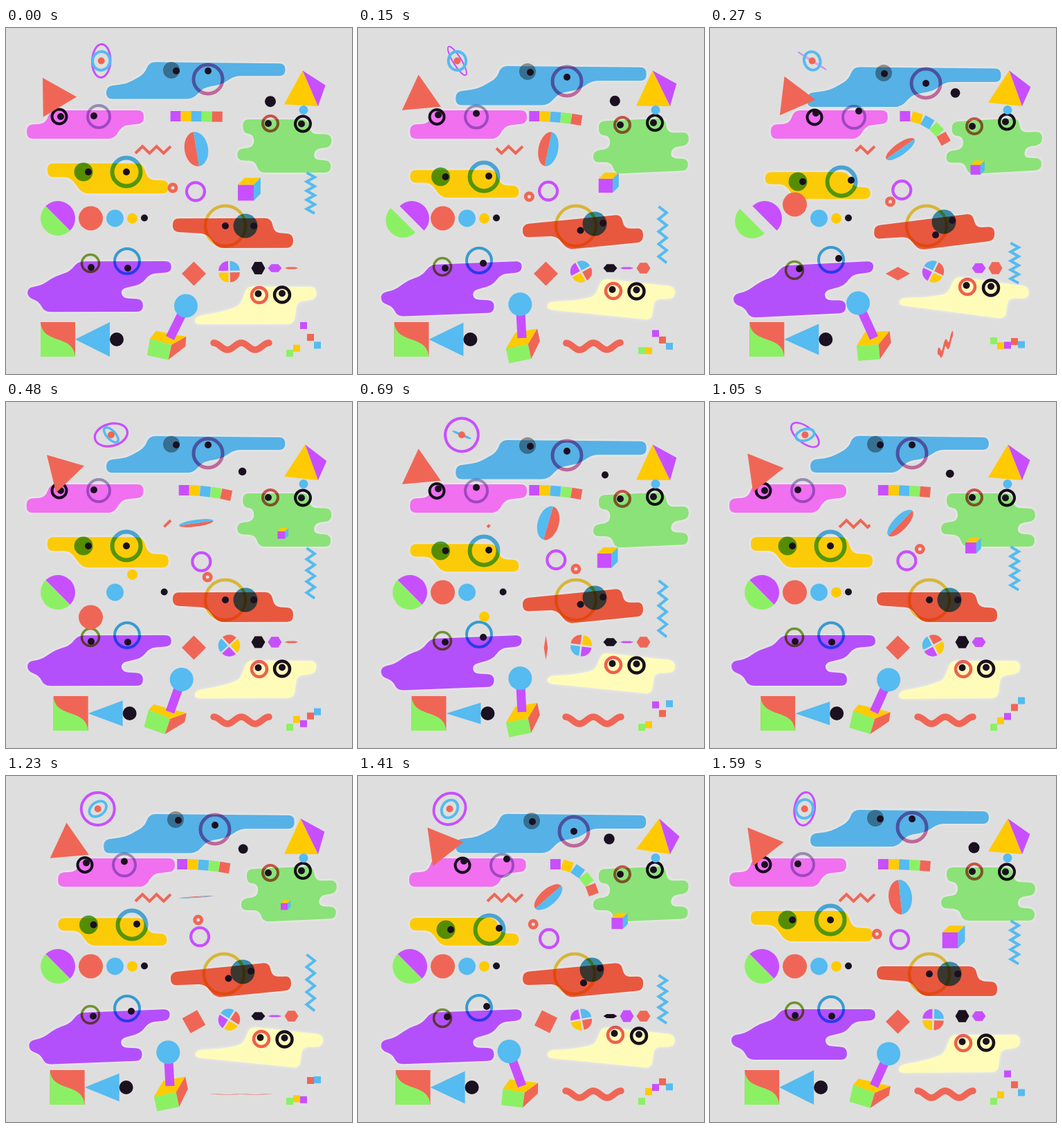
Animation of 500x500 px, one loop 1620 ms. Source, as an HTML page with a canvas:

```html
<!DOCTYPE html>
<html lang="en">
<head>
<meta charset="utf-8">
<title>Shapes at play</title>
<style>
html, body { margin: 0; overflow: hidden; background: #dedede; }
canvas { display: block; }
</style>
</head>
<body>
<canvas id="stage" width="500" height="500"></canvas>
<script>
const ctx = document.getElementById('stage').getContext('2d');
const PURPLE = '#c84fff', YELLOW = '#ffca00', BLUE = '#55bbf0', GREEN = '#8cf064', RED = '#f06656', BLACK = '#1a1020';
const LOOP = 1620, BEAT = LOOP / 3, STEP = 30;
const { PI, sin, cos, abs, min, max } = Math;
const TAU = PI * 2, DEG = PI / 180;
let time = 0;

// Motion: cosine swings with a given peak time, and one-off moves inside the loop.
const swing = (period, mid, amp, peak) => mid + amp * cos(TAU * (time - peak) / period);
const beat = (mid, amp, peak) => swing(BEAT, mid, amp, peak);
const loop = (mid, amp, peak = 0) => swing(LOOP, mid, amp, peak);
const progress = (start, length) => min(1, max(0, (time - start) / length));
const flip = (start, length) => abs(cos(PI * progress(start, length)));
const wobble = start => sin(TAU * progress(start, 320));
const degrees = () => 360 * time / LOOP;
const mix = (a, b, k) => a + (b - a) * k;
const middle = v => (min(...v) + max(...v)) / 2;
const range = n => [...Array(n).keys()];

function fill(color) {
  ctx.fillStyle = color;
  ctx.fill();
}

function poly(color, ...points) {
  ctx.beginPath();
  points.forEach(p => ctx.lineTo(...p));
  fill(color);
}

function disc(color, x, y, r) {
  ctx.beginPath();
  ctx.arc(x, y, r, 0, TAU);
  fill(color);
}

function sector(color, x, y, r, from, sweep) {
  ctx.beginPath();
  ctx.moveTo(x, y);
  ctx.arc(x, y, r, from, from + sweep);
  fill(color);
}

function ring(color, x, y, rx, width, ry = rx, angle = 0) {
  ctx.beginPath();
  ctx.ellipse(x, y, rx, abs(ry), angle * DEG, 0, TAU);
  ctx.strokeStyle = color;
  ctx.lineWidth = width;
  ctx.stroke();
}

function rect(color, x, y, w, h = w) {
  ctx.fillStyle = color;
  ctx.fillRect(x, y, w, h);
}

function line(color, width, points) {
  ctx.beginPath();
  points.forEach(p => ctx.lineTo(...p));
  ctx.strokeStyle = color;
  ctx.lineWidth = width;
  ctx.stroke();
}

function placed(x, y, angle, draw) {
  ctx.save();
  ctx.translate(x, y);
  ctx.rotate(angle * DEG);
  draw();
  ctx.restore();
}

// Each body stretches from its outline: shift, slope and scale at the far end of the swing.
// Each eye: colour, radius, ring width (0 = filled), centre, step per pose, gaze, gaze step per pose.
const monsters = [
  { color: '#56b1e6', shift: [6.5, 10], slope: 0, scale: [1.09, 1.09],
    outline: [[207,49],[403,51],[403,69],[330,69],[312,81],[285,86],[270,102],[145,102],[145,84],[175,80],[200,66]],
    eyes: [['#a0a0a0', 12, 0, [239,61], [6,2], [7,1], [-3,0]],
           ['#d878b0', 21, 5, [292,74], [10,3], [0,-12], [0,6]]] },
  { color: '#f070f0', shift: [62, 0], slope: 0, scale: [1, 1],
    outline: [[62,119],[197,119],[197,138],[166,141],[154,160],[28,160],[28,140],[55,138]],
    eyes: [[BLACK, 10.5, 4, [77,128], [37,.5], [2,0], [0,-3]],
           ['#aaa0cc', 16, 4, [134,128], [37,.5], [-7,-1], [7,-4]]] },
  { color: '#fccb08', shift: [9, 11], slope: 0, scale: [.86, .88],
    outline: [[59,195],[197,195],[206,219],[235,220],[235,239],[110,239],[92,215],[59,215]],
    eyes: [['#56b040', 13.5, 0, [112,208], [7.5,7], [7,0], [0,0]],
           [BLUE, 20.5, 6, [174,208], [8,7], [0,0], [7,-1]]] },
  { color: '#8be278', shift: [9, 0], slope: -.06, scale: [1.02, 1],
    outline: [[342,132],[436,132],[440,153],[470,154],[470,172],[446,175],[444,190],[469,192],[469,209],[365,209],[360,192],[334,191],[334,175],[358,172],[358,154],[342,152]],
    eyes: [['#e06050', 11, 4, [382,138], [0,2], [-3,0], [0,0]],
           [BLACK, 11, 4, [429,138.5], [0,-1.5], [-2,0], [0,0]]] },
  { color: '#e8583f', shift: [-4, 0], slope: -.13, scale: [1, 1],
    outline: [[241,275],[383,275],[388,296],[415,298],[415,318],[306,318],[290,297],[241,294]],
    eyes: [['#f8d040', 29, 4.5, [317,286], [-2,0], [0,0], [6.5,6.5]],
           ['#409ec0', 17.5, 0, [346,286], [-4,-3], [12,0], [0,-1]]] },
  { color: '#b450fb', shift: [0, 5], slope: -.05, scale: [.97, 1],
    outline: [[104,337],[239,337],[239,353],[208,355],[196,370],[166,377],[168,390],[198,392],[198,410],[55,410],[48,395],[31,389],[31,375],[50,372],[72,358],[92,352]],
    eyes: [['#80a838', 12.5, 3.5, [122,340], [0,5], [1,6], [3,-4]],
           ['#40b2f0', 18, 4, [175,337], [0,-1], [1,10], [5,-6]]] },
  { color: '#fffcba', shift: [7, -15], slope: .15, scale: [1.07, .95],
    outline: [[348,374],[448,374],[448,392],[420,396],[416,428],[272,429],[274,418],[310,411],[338,402]],
    eyes: [['#f06068', 11, 4.5, [366,386], [3,-6], [-1.5,-2], [0,0]],
           [BLACK, 11, 4.5, [399,385.5], [3.5,-5], [0,-2], [0,0]]] }
];

function body({ color, outline, shift, slope, scale }, k) {
  const cx = middle(outline.map(p => p[0])), cy = middle(outline.map(p => p[1])), n = outline.length;
  const points = outline.map(([x, y]) => [
    cx + (x - cx) * mix(1, scale[0], k) + shift[0] * k,
    cy + (y - cy) * mix(1, scale[1], k) + (shift[1] + slope * (x - cx)) * k
  ]);
  ctx.save();
  ctx.beginPath();
  points.forEach((p, i) => {
    const toward = q => {
      const d = Math.hypot(q[0] - p[0], q[1] - p[1]), f = min(9, d / 2) / d;
      return [mix(p[0], q[0], f), mix(p[1], q[1], f)];
    };
    ctx.lineTo(...toward(points[(i + n - 1) % n]));
    ctx.quadraticCurveTo(...p, ...toward(points[(i + 1) % n]));
  });
  ctx.closePath();
  ctx.shadowColor = 'rgba(255,255,255,.6)';
  ctx.shadowBlur = 5;
  fill(color);
  ctx.restore();
}

function eye([color, r, width, centre, step, gaze, turn], pose) {
  const [x, y] = centre.map((c, i) => c + step[i] * pose);
  ctx.globalCompositeOperation = 'multiply';
  if (width) ring(color, x, y, r, width);
  else disc(color, x, y, r);
  ctx.globalCompositeOperation = 'source-over';
  disc(BLACK, x + gaze[0] + turn[0] * pose, y + gaze[1] + turn[1] * pose, 5);
}

function crowd() {
  const k = beat(.5, .5, 238), t = time % BEAT;
  const pose = t < 90 || t >= 480 ? 0 : t < 210 || t >= 360 ? 1 : 2;
  monsters.forEach(m => {
    body(m, k);
    m.eyes.forEach(e => eye(e, pose));
  });
}

function target() {
  const x = loop(142, 10, 520), turn = degrees();
  const tilt = 50 + turn - 25 * sin((turn - 15) * DEG);
  const innerTilt = turn / 2 - 12 + loop(15, -15);
  ring(PURPLE, x, 47.5, 24, 4 * abs(cos(tilt * DEG)) ** .5, 24 * cos(tilt * DEG), 92 - turn);
  ring(BLUE, x, 47.5, 13.5, 4 * abs(cos(innerTilt * DEG)) ** .2, 12.8 * cos(innerTilt * DEG), 100 - turn / 2);
  disc(RED, x, 47.5, 5);
}

function triangle() {
  placed(beat(95, 27, 300), 100, beat(-117, 22, 150), () =>
    poly(RED, ...[0, 120, 240].map(a => [32.5 * cos(a * DEG), 32.5 * sin(a * DEG)])));
}

function pyramid() {
  const sway = beat(0, 1, 375);
  const top = [430.5 + 5.5 * sway, 61.5], front = [451, 113];
  poly(YELLOW, top, front, [402, 109 - 4 * sway]);
  poly(PURPLE, top, [462.5 + 2.5 * sway, 84 + 4 * sway], front);
  disc(BLUE, 430, 118.5, 6.5);
}

function strip() {
  const k = beat(.5, .5, 320);
  placed(234 + 44 * k, 135, 0, () => {
    [PURPLE, YELLOW, BLUE, GREEN, RED].forEach(color => {
      rect(color, 0, -15, 15);
      ctx.translate(15, 0);
      ctx.rotate(17.5 * k ** 1.7 * DEG);
    });
  });
}

function zigzags() {
  const leaving = time < 600;
  const start = leaving ? progress(0, 590) : 0, end = leaving ? 1 : progress(660, 450);
  const size = 5 * Math.hypot(10.2, 10);
  ctx.setLineDash([size * (end - start), size * 2]);
  ctx.lineDashOffset = -size * start;
  if (end > start) line(RED, 4, range(6).map(i => [187 + 10.2 * i, i % 2 ? 171 : 181]));
  ctx.setLineDash([]);

  const k = beat(.5, .5, 262), top = 209 + 102 * k ** 1.6, bottom = 267 + 102 * k ** .75;
  line(BLUE, 4, range(10).map(i => [i % 2 ? 446 : 434.5, mix(top, bottom, i / 9)]));
}

function halves() {
  const bulge = loop(0, 17);
  placed(275, 175, swing(LOOP / 2, 128, -48, 22), () =>
    [RED, BLUE].forEach((color, side) => {
      ctx.beginPath();
      ctx.ellipse(0, 0, 25, abs(bulge), 0, 0, PI, (bulge < 0) !== (side === 1));
      fill(color);
    }));
}

function cube() {
  const k = swing(LOOP / 2, .5, -.5, 10) ** 1.2;
  const x = 335 + 62 * k, y = 226.5 - 43 * k, s = 23 - 13 * k, d = s * .43;
  rect(PURPLE, x, y, s);
  poly(YELLOW, [x, y], [x + d, y - d], [x + d + s, y - d], [x + s, y]);
  poly(BLUE, [x + s, y], [x + s + d, y - d], [x + s + d, y + s - d], [x + s, y + s]);
}

function circles() {
  const split = abs(wobble(30));
  sector(GREEN, 75 - 14 * split, 275 + 4 * split, 25, 45 * DEG, PI);
  sector(PURPLE, 75 + 4 * split, 275, 25, 225 * DEG, PI);
  disc(RED, 122.5, 275 - 36 * wobble(240), 17.5);
  disc(BLUE, 157.5, 275, 12.5);
  disc(YELLOW, 182.5, 275 - 36 * wobble(440), 7.5);
  disc(BLACK, 200 + 31 * sin(PI * progress(330, 400)), 274.5, 5);

  disc(BLACK, loop(357, 10) + swing(LOOP / 2, 0, 15, 0), beat(100, 9, 70), loop(6.5, 1.5, -60));
  ring(RED, loop(280, -39), loop(231, 23, LOOP / 4), 5, 5);
  ring(PURPLE, loop(280.5, -6.5), loop(232, 4.3), 13, 4.2);
}

function trinkets() {
  placed(271.5, 355, 90 * progress(1180, 290), () => {
    const w = 17.5 * flip(560, 290), h = 17.5 * flip(180, 290);
    poly(RED, [0, -h], [w, 0], [0, h], [-w, 0]);
  });
  placed(322.5, 352, loop(-86, -88, 740), () =>
    [PURPLE, BLUE, RED, YELLOW].forEach((color, i) => {
      const from = PI + i * PI / 2, mid = from + PI / 4;
      sector(color, 1.8 * cos(mid), 1.8 * sin(mid), 14, from, PI / 2);
    }));
  [BLACK, PURPLE, RED].forEach((color, i) => {
    const x = 364.5 + 24 * i, h = 9 * cos((degrees() * 1.5 + 50 * i) * DEG);
    poly(color, [x - 10, 347], [x - 5, 347 - h], [x + 5, 347 - h], [x + 10, 347], [x + 5, 347 + h], [x - 5, 347 + h]);
  });
}

function train() {
  const x = loop(64.5, -14.5), h = loop(20, 5);
  rect(RED, x, 425, 50);
  ctx.beginPath();
  ctx.moveTo(x, 425);
  ctx.bezierCurveTo(x + 2, 458, x + 48, 442, x + 50, 475);
  ctx.lineTo(x, 475);
  fill(GREEN);
  poly(BLUE, [x + 50, 450], [x + 100, 450 - h], [x + 100, 450 + h]);
  disc(BLACK, x + 110, 450, 10);
}

function joystick() {
  const k = beat(.5, .5, 450);
  const corner = (x, y, x2, y2) => [mix(x, x2, k), mix(y, y2, k)];
  const left = corner(214, 464, 206, 444), front = corner(246, 457, 237, 458);
  const right = corner(259, 434, 261, 450), foot = corner(251, 478, 229, 480);
  poly(YELLOW, left, corner(228, 440, 213, 437), right, front);
  poly(GREEN, left, front, foot, corner(219, 485, 199, 469));
  poly(RED, front, right, corner(263, 452, 258, 463), foot);
  const ball = [beat(237, 23, 5), beat(399.5, 2, 0)];
  line(PURPLE, 13, [[237, 448], ball]);
  disc(BLUE, ...ball, 17);
}

function wave() {
  const w = flip(130, 330), h = max(.06, flip(1060, 330));
  ctx.save();
  ctx.transform(max(.25, w), -.4 * (1 - w), 0, h, 340, 460);
  ctx.lineCap = ctx.lineJoin = 'round';
  line(RED, 9.5, range(41).map(i => [i * 2 - 40, -5 * cos(i / 20 * TAU)]));
  ctx.restore();
}

function pixels() {
  const heights = [
    470 - 18 * sin(PI * progress(130, 300)),
    beat(461, 6, 110),
    swing(LOOP / 2, 449, -19, 0),
    loop(447, 7, LOOP / 4),
    loop(445, 15, 120)
  ];
  [GREEN, YELLOW, PURPLE, RED, BLUE].forEach((color, i) => rect(color, 405 + 10 * i, heights[i] - 5, 10));
}

const scene = [crowd, target, triangle, pyramid, strip, zigzags, halves, cube, circles, trinkets, train, joystick, wave, pixels];

function frame() {
  time = Math.floor(performance.now() / STEP) * STEP % LOOP;
  rect('#dedede', 0, 0, 500);
  scene.forEach(draw => draw());
  requestAnimationFrame(frame);
}
frame();
</script>
</body>
</html>
```
